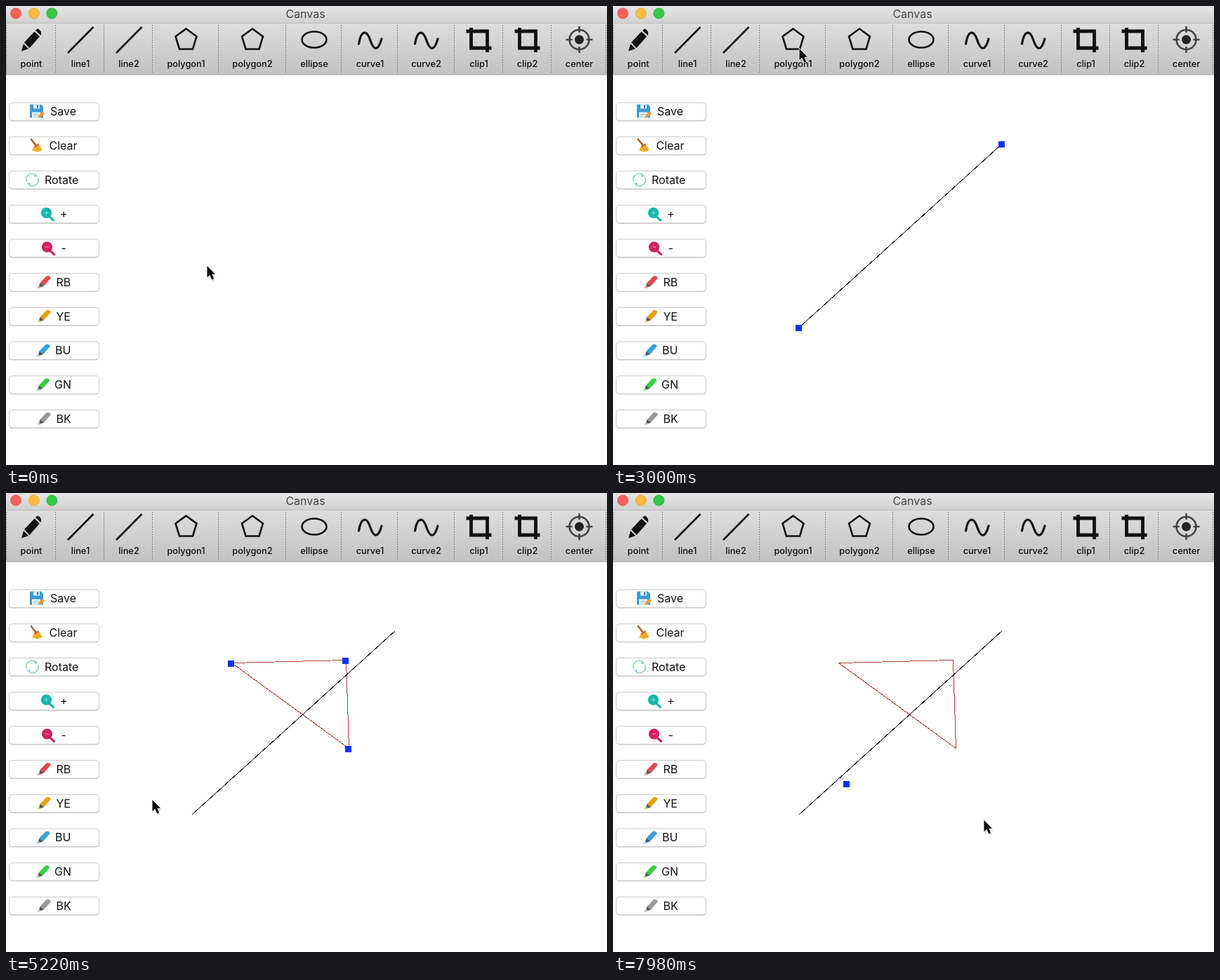
An HTML page for the animation above (8 s loop, 856x655 px).

```html
<!DOCTYPE html>
<html lang="en">
<head>
<meta charset="utf-8">
<title>Canvas</title>
<style>
  html, body { margin: 0; width: 100%; height: 100%; overflow: hidden; background: #fff; }
  svg { display: block; width: 856px; height: 655px; }
  text { font: 16px Inter, "Open Sans", sans-serif; fill: #111; }
  .title { fill: #444; text-anchor: middle; }
  .label { font-size: 12.8px; font-weight: 500; text-anchor: middle; }
  .tool { fill: none; stroke: #111; stroke-width: 2.6; }
  .crisp { fill: none; shape-rendering: crispEdges; }
  .face { fill: #fff; stroke: #c9c9c9; }
  .pressed .face { fill: #3b8df5; stroke: #2f7ce0; }
  .pressed text { fill: #fff; }
</style>
</head>
<body>
<svg viewBox="0 0 856 655">
  <defs>
    <linearGradient id="titleFill" x2="0" y2="1">
      <stop stop-color="#e6e6e6"/><stop offset="1" stop-color="#d1d1d1"/>
    </linearGradient>
    <linearGradient id="barFill" x2="0" y2="1">
      <stop stop-color="#dedede"/><stop offset="1" stop-color="#c2c2c2"/>
    </linearGradient>
  </defs>
  <rect width="856" height="24" fill="url(#titleFill)"/>
  <rect y="24" width="856" height="74" fill="url(#barFill)"/>
  <path d="M0 24.5H856" stroke="#bdbdbd"/>
  <path d="M0 98H856" stroke="#a2a2a2"/>
  <g stroke-width=".8">
    <circle cx="14" cy="10.5" r="7.5" fill="#fc605b" stroke="#df4a45"/>
    <circle cx="39.8" cy="10.5" r="7.5" fill="#fdbb3f" stroke="#de9f34"/>
    <circle cx="65.3" cy="10.5" r="7.5" fill="#34c748" stroke="#27a936"/>
  </g>
  <text class="title" x="426.5" y="16.5">Canvas</text>
  <g id="toolbar"></g>
  <g id="buttons"></g>
  <g id="drawing"></g>
  <g id="cursor">
    <path d="M1 3V20L5 16.500L8 23L11.500 21.500L9 15.500H14Z" fill="#000" opacity=".16"/>
    <path d="M.5 1V17.300L4.300 13.800L7.300 20.600L10.200 19.300L7.200 12.700H12Z"
      fill="#000" stroke="#fff" stroke-width="1.5" paint-order="stroke"/>
  </g>
</svg>
<script>
const byId = id => document.getElementById(id);
const path = (d, attrs = '') => `<path d="${d}" ${attrs}/>`;

// Toolbar
const slash = path('M-18 19L18.500-18');
const pentagon = path('M0-15.500L15-4.500L9.500 13.500H-9.500L-15-4.500Z');
const wave = path('M-16 6C-13-13-5-15 0 0S11 18 16.500-1', 'stroke-width="3.2" stroke-linecap="round"');
const crop = path('M-18-12H12V18M-11-17V12H18', 'stroke-width="4.8"');
const pencil = path('M-10 4L4.500-11.500L12-4.500L-2.500 12ZM-11 6L-4 13L-14 16.500ZM6-13L8-15Q10-16.500 13-12.500Q15-10 13.500-6Z',
  'fill="#111" stroke="none"');
const target = `<g stroke="#444"><circle r="14"/>${path('M0-19V-10M0 19V10M-19 0H-10M19 0H10')}</g>
  <circle r="6.5" fill="#222" stroke="none"/>`;
const tools = [
  ['point', 36, pencil], ['line1', 106, slash], ['line2', 175, slash],
  ['polygon1', 256.5, pentagon], ['polygon2', 351, pentagon],
  ['ellipse', 439, '<ellipse rx="17.5" ry="11.5"/>'],
  ['curve1', 518.5, wave], ['curve2', 598.5, wave],
  ['clip1', 673.5, crop], ['clip2', 742.5, crop], ['center', 816.5, target]
];
const dividers = [1, 71, 140, 209, 303, 399, 478, 558, 639, 708, 777, 855];
byId('toolbar').innerHTML =
  dividers.map(x => path(`M${x - .5} 27V97`, 'stroke="#666" stroke-dasharray="1.5 2"')).join('') +
  tools.map(([name, x, icon]) =>
    `<g class="tool" transform="translate(${x} 48)">${icon}</g><text class="label" x="${x}" y="87">${name}</text>`).join('');

// Side buttons
const pen = color =>
  path('M3.500-8.500Q7.500-10.500 10-6L0 5.500L-5.500 1Z', `fill="${color}"`) +
  path('M-5.500 1L0 5.500L-4 7L-7 6Z', 'fill="#555"') +
  path('M-10.500 8.500L-6.500 5L-4 8.500Z', `fill="${color}" opacity=".6"`);
const magnifier = (color, sign) =>
  path('M3 4L8.500 9', `stroke="${color}" stroke-width="3.2" stroke-linecap="round"`) +
  `<circle cx="-1.500" cy="-1.500" r="7.6" fill="${color}"/>` + path(sign, 'stroke="#fff" opacity=".6"');
const floppy =
  path('M-10-10H6L9-7V9H-10Z', 'fill="#399bd4"') +
  path('M-5-10H4V-4H-5Z', 'fill="#d9edf7"') + path('M0-9H2V-5H0Z', 'fill="#39729c"') +
  path('M-7 1H5V9H-7Z', 'fill="#eef3f6"') + path('M-5 4H3M-5 6.500H1', 'stroke="#9bb"') +
  path('M1 9L3 5L8 0L11 3L6 8Z', 'fill="#ef9734"');
const broom =
  path('M-7-9L0 0', 'stroke="#a5632d" stroke-width="2.6" stroke-linecap="round"') +
  path('M-3 1L3-3L9 6L5 8L1 9L-6 7Z', 'fill="#f5b52e"') +
  path('M-3 1L3-3L4-1L-2 3Z', 'fill="#d75a35"') + path('M0 4L2 8M3 2L6 7', 'stroke="#c9851c"');
const turn =
  path('M-8 3A8.500 8.500 0 0 1 5-7M8-3A8.500 8.500 0 0 1-5 7', 'fill="none" stroke="#8ed6b0" stroke-width="1.6"') +
  path('M3-9L8-5L3-4ZM-3 9L-8 5L-3 4Z', 'fill="#8cc8e0"');
const buttons = [
  ['Save', 63, 44, floppy], ['Clear', 61.5, 43, broom], ['Rotate', 55, 37.5, turn],
  ['+', 77, 59, magnifier('#12b5ac', 'M-4.500-1.500H1.500M-1.500-4.500V1.500')],
  ['-', 78.500, 60, magnifier('#d12062', 'M-4.500-1.500H1.500')],
  ['RB', 71.5, 54, pen('#e2484d')], ['YE', 71.5, 54, pen('#eaa013')],
  ['BU', 70, 53, pen('#38a4dc')], ['GN', 69, 52.5, pen('#35cf45')], ['BK', 71.5, 54, pen('#999')]
];
byId('buttons').innerHTML = buttons.map(([name, textX, iconX, icon], i) =>
  `<g transform="translate(0 ${150.5 + 48.72 * i})">
    <rect x="4.500" y="-11.500" width="128" height="25.5" rx="4.5" fill="#c2c2c2"/>
    <rect class="face" x="4.500" y="-12.500" width="128" height="25.5" rx="4.5"/>
    <g transform="translate(${iconX} 0)">${icon}</g><text x="${textX}" y="5.8">${name}</text></g>`).join('');
const buttonNodes = byId('buttons').children;

// Pointer stops: time, x, y
const LOOP = 8000, STEP = 60;
const stops = [
  [0, 286, 370], [300, 108, 48], [360, 108, 48], [600, 264, 459], [660, 266, 457],
  [960, 553, 197], [1140, 553, 197], [1680, 96, 422], [1740, 94, 420], [2040, 92, 396],
  [2520, 92, 394], [2940, 265, 60], [3060, 265, 60], [3360, 320, 243], [3540, 321, 243],
  [3660, 342, 243], [3960, 483, 239], [4080, 483, 239], [4380, 487, 365], [4740, 487, 365],
  [5220, 208, 437], [5640, 108, 434], [6240, 104, 430], [6420, 104, 432], [6840, 352, 60],
  [7020, 352, 60], [7500, 332, 415], [7680, 332, 415], [7980, 528, 466]
];
const presses = [[5, 2100, 2220], [6, 6300, 6420]];

function pointerAt(time) {
  const next = stops.findIndex(stop => stop[0] > time);
  if (next < 0) return stops.at(-1).slice(1);
  const [t0, x0, y0] = stops[next - 1], [t1, x1, y1] = stops[next];
  const u = (time - t0) / (t1 - t0), k = u * u * (3 - 2 * u);
  return [x0 + (x1 - x0) * k, y0 + (y1 - y0) * k];
}

// Shapes: colour, vertices with the time of each click
const shapes = [
  { color: '#000', points: [[264, 459, 600], [553, 197, 1020]] },
  { color: '#b13a35', points: [[320, 243, 3420], [483, 239, 4020], [487, 365, 4380]] },
  { color: '#eaa013', points: [[332, 415, 7620]] }
];

function drawingAt(time) {
  const started = shapes.filter(shape => time >= shape.points[0][2]);
  let handles = '';
  const lines = started.map(({ color, points }, i) => {
    const placed = points.filter(point => time >= point[2]);
    if (i === started.length - 1) {
      handles = placed.map(([x, y]) => `<rect x="${x - 4}" y="${y - 4}" width="9" height="9" fill="#0433ff"/>`).join('');
    }
    if (placed.length < 2) return '';
    const d = 'M' + placed.map(([x, y]) => `${x + 1.5} ${y - .5}`).join('L') + (placed.length > 2 ? 'Z' : '');
    return path(d, `class="crisp" stroke="${color}"`);
  });
  return lines.reverse().join('') + handles;
}

let lastTime = -1;
function render(now) {
  const time = Math.floor((now % LOOP) / STEP) * STEP;
  if (time !== lastTime) {
    lastTime = time;
    const [x, y] = pointerAt(time);
    byId('cursor').setAttribute('transform', `translate(${x.toFixed(1)} ${y.toFixed(1)})`);
    byId('drawing').innerHTML = drawingAt(time);
    for (const [index, from, to] of presses) {
      buttonNodes[index].classList.toggle('pressed', time >= from && time < to);
    }
  }
  requestAnimationFrame(render);
}
const start = performance.now();
const tick = () => performance.now() - start;
render(0);
</script>
</body>
</html>
```
